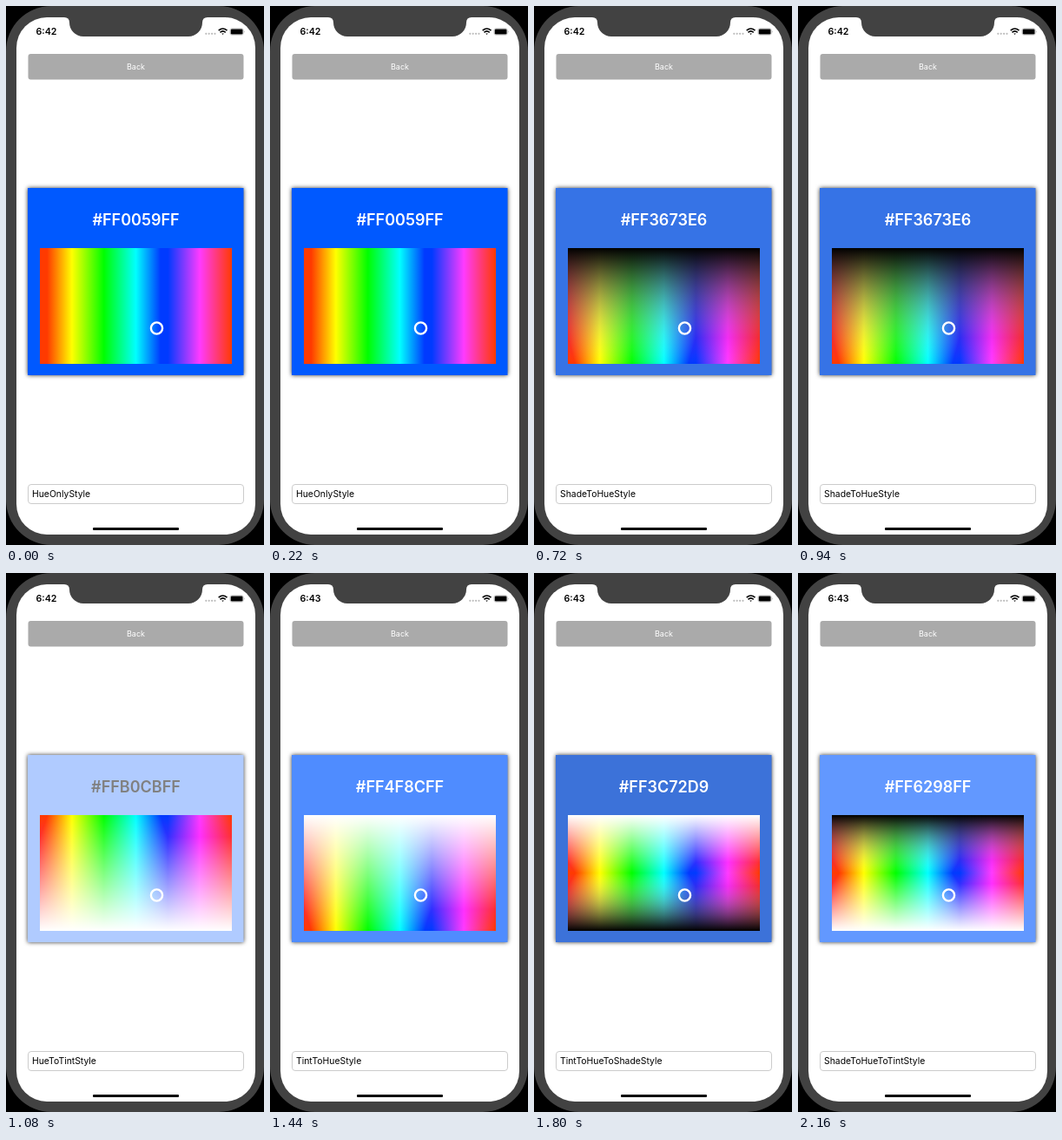
Recreate the animation shown at these times as an HTML page with a canvas. Size 297x619 px, loop 2520 ms.

```html
<!DOCTYPE html>
<html lang="en">
<head>
<meta charset="utf-8">
<title>Colour spectrum styles</title>
<style>
  html, body { margin: 0; width: 100%; height: 100%; overflow: hidden; background: #000; }
  svg, canvas { position: absolute; display: block; }
  svg { left: 0; top: 0; }
  canvas { left: 39px; top: 278px; }
  text { font-family: Inter, "Liberation Sans", sans-serif; }
  #card { filter: drop-shadow(0 0 2.5px rgba(0, 0, 0, .8)); }
</style>
</head>
<body>
<svg width="297" height="619" viewBox="0 0 297 619">
  <rect width="297" height="619" rx="52" fill="#424242"/>
  <rect x="12" y="13" width="275" height="594" rx="35" fill="#fff"/>
  <path d="M67 12.5V13q6 0 6 6a16 16 0 0 0 16 16H210a16 16 0 0 0 16-16q0-6 6-6V12.5Z" fill="#424242"/>

  <text id="clock" x="34.5" y="33" font-size="10.7" font-weight="600"></text>
  <g fill="#bbb">
    <circle cx="230.3" cy="31.8" r="1.1"/><circle cx="233.7" cy="31.8" r="1.1"/>
    <circle cx="237.1" cy="31.8" r="1.1"/><circle cx="240.5" cy="31.8" r="1.1"/>
  </g>
  <g fill="none" stroke="#000" stroke-width="1.6">
    <path d="M244.7 28.2q4.9-4.4 9.8 0M246.5 30.3q3.1-2.7 6.2 0"/>
    <path d="M248.3 31.4h2.6l-1.3 1.5Z" fill="#000" stroke="none"/>
  </g>
  <rect x="257.9" y="25.7" width="15.4" height="7.6" rx="2.2" fill="none" stroke="#bbb" stroke-width=".7"/>
  <rect x="258.7" y="26.4" width="13.8" height="6.2" rx="1.4"/>
  <path d="M274.2 28.2q1.4 1.3 0 2.6Z" fill="#aaa"/>

  <rect x="25.5" y="55" width="248" height="29.5" rx="3" fill="#aaa"/>
  <text x="149.5" y="73" font-size="9" fill="#fff" text-anchor="middle">Back</text>

  <rect id="card" x="25" y="209" width="248.5" height="215"/>
  <text id="hex" x="149.5" y="251.5" font-size="18" font-weight="600" text-anchor="middle"></text>

  <rect x="25.5" y="549.5" width="248" height="22" rx="3.5" fill="#fff" stroke="#ccc"/>
  <text id="style" x="30" y="564" font-size="10.4"></text>
  <rect x="100" y="599" width="99" height="3" rx="1"/>
</svg>
<canvas id="spectrum" width="221" height="133"></canvas>
<svg width="297" height="619" viewBox="0 0 297 619">
  <circle cx="173.5" cy="370" r="6.6" fill="none" stroke="#fff" stroke-width="2.4"/>
</svg>

<script>
const STEP_MS = 360;
const CLEAR = 'rgba(255,255,255,0)', SHADE = '#000', TINT = '#fff';
const HUES = ['#f00', '#ff0', '#0f0', '#0ff', '#00f', '#f0f', '#f00'];
const GREEN_FLOOR = '#003a00';

const steps = [
  { style: 'HueOnlyStyle', rgb: '0059FF', fade: [CLEAR, CLEAR] },
  { style: 'HueToShadeStyle', rgb: '365185', fade: [CLEAR, SHADE] },
  { style: 'ShadeToHueStyle', rgb: '3673E6', fade: [SHADE, CLEAR] },
  { style: 'HueToTintStyle', rgb: 'B0CBFF', fade: [CLEAR, TINT], ink: '#808080' },
  { style: 'TintToHueStyle', rgb: '4F8CFF', fade: [TINT, CLEAR], time: '6:43' },
  { style: 'TintToHueToShadeStyle', rgb: '3C72D9', fade: [TINT, CLEAR, SHADE], time: '6:43' },
  { style: 'ShadeToHueToTintStyle', rgb: '6298FF', fade: [SHADE, CLEAR, TINT], time: '6:43' }
];

const byId = id => document.getElementById(id);
const canvas = byId('spectrum');
const ctx = canvas.getContext('2d');

function paint(colors, dx, dy, blend = 'source-over') {
  const gradient = ctx.createLinearGradient(0, 0, dx, dy);
  colors.forEach((color, i) => gradient.addColorStop(i / (colors.length - 1), color));
  ctx.globalCompositeOperation = blend;
  ctx.fillStyle = gradient;
  ctx.fillRect(0, 0, canvas.width, canvas.height);
}

function show({ style, rgb, fade, ink = '#fff', time = '6:42' }) {
  byId('clock').textContent = time;
  byId('style').textContent = style;
  byId('card').setAttribute('fill', '#' + rgb);
  byId('hex').textContent = '#FF' + rgb;
  byId('hex').setAttribute('fill', ink);
  paint(HUES, canvas.width, 0);
  // Canvas gradients blend unpremultiplied, which gives the shade its grey midtones.
  paint(fade, 0, canvas.height);
  // The display cannot show fully saturated blue to red, so pure hues keep some green.
  const floor = fade.map(stop => stop === CLEAR ? GREEN_FLOOR : SHADE);
  paint(floor, 0, canvas.height, 'lighten');
}

let current = -1;
const start = performance.now();
function tick() {
  const elapsed = performance.now() - start;
  const next = Math.floor(elapsed / STEP_MS) % steps.length;
  if (next !== current) show(steps[current = next]);
  requestAnimationFrame(tick);
}
tick();
</script>
</body>
</html>
```
